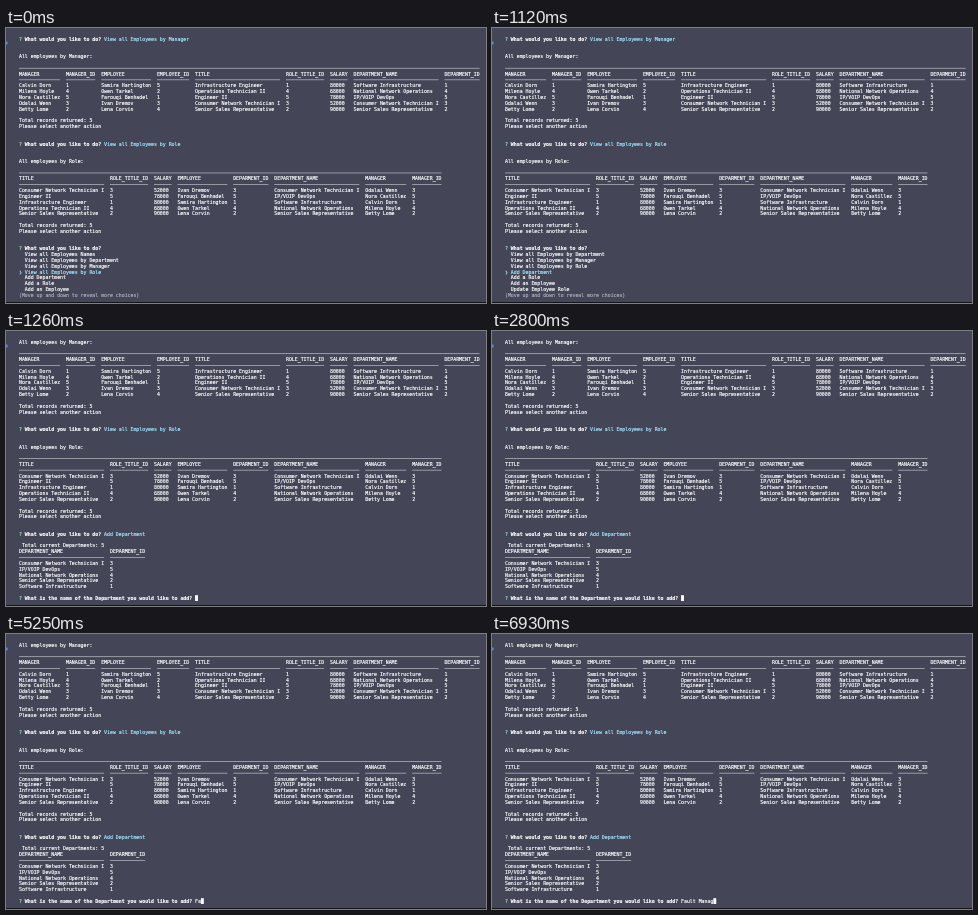
An HTML page with a canvas that plays this animation: 480 px wide and 275 px high, repeating every 8000 ms.

```html
<!DOCTYPE html>
<html lang="en">
<head>
<meta charset="utf-8">
<title>Employee tracker</title>
<style>
  html, body { margin: 0; width: 100%; height: 100%; overflow: hidden; background: #444657; }
  canvas { display: block; }
</style>
</head>
<body>
<canvas id="stage" width="480" height="275"></canvas>
<script>
const ctx = document.getElementById('stage').getContext('2d');
const LOOP = 8000, LEFT = 13, TOP = 11, CELL = 2.934, LINE = 5.82;
const FONT_SIZE = 40, SCALE = CELL / (FONT_SIZE * 0.602);
const BACK = '#444657', WHITE = '#fafafc', GREEN = '#a5e6c8', CYAN = '#a0e4ff', GREY = '#a8aab5', RULE = '#cfd0d6';

const roles = ['Consumer Network Technician I', 'Engineer II', 'Infrastructure Engineer',
  'Operations Technician II', 'Senior Sales Representative'];
const departments = ['Consumer Network Technician I', 'IP/VOIP DevOps', 'National Network Operations',
  'Senior Sales Representative', 'Software Infrastructure'];

// role, role id, salary, employee, department id, department, manager, manager id, employee id
const staff = [
  [roles[0], 3, 52000, 'Ivan Dremov', 3, departments[0], 'Odalai Wenn', 3, 3],
  [roles[1], 5, 78000, 'Farouqi Benhadel', 5, departments[1], 'Nora Castillez', 5, 1],
  [roles[2], 1, 80000, 'Samira Hartington', 1, departments[4], 'Calvin Dorn', 1, 5],
  [roles[3], 4, 68000, 'Owen Tarkel', 4, departments[2], 'Milena Hoyle', 4, 2],
  [roles[4], 2, 90000, 'Lena Corvin', 2, departments[3], 'Betty Lome', 2, 4]
];
const heads = ['TITLE', 'ROLE_TITLE_ID', 'SALARY', 'EMPLOYEE', 'DEPARMENT_ID',
  'DEPARTMENT_NAME', 'MANAGER', 'MANAGER_ID', 'EMPLOYEE_ID'];
const managerOrder = [6, 7, 3, 8, 0, 1, 2, 5, 4];
const pick = (row, order) => order.map(i => row[i]);

const menu = ['View all Employees Names', 'View all Employees by Department', 'View all Employees by Manager',
  'View all Employees by Role', 'Add Department', 'Add a Role', 'Add an Employee', 'Update Employee Role'];

const answer = 'Fault Manag';
const keyTimes = [4970, 5250, 5460, 5670, 5880, 6020, 6300, 6510, 6580, 6790, 6930];

let scroll = 0;
const x = col => LEFT + col * CELL;
const y = row => TOP + (row - scroll) * LINE;

function write(row, col, text, color = WHITE, bold = false) {
  ctx.setTransform(SCALE, 0, 0, SCALE, x(col), y(row) + 1.75);
  ctx.font = `${bold ? 'bold ' : ''}${FONT_SIZE}px "DejaVu Sans Mono", monospace`;
  ctx.fillStyle = ctx.strokeStyle = color;
  ctx.lineWidth = 1.5;
  ctx.fillText(text, 0, 0);
  ctx.strokeText(text, 0, 0);
  ctx.setTransform(1, 0, 0, 1, 0, 0);
}

function rule(row, col, length) {
  ctx.fillStyle = RULE;
  ctx.fillRect(x(col), y(row) - 0.2, length * CELL, 0.6);
}

function prompt(row, question, reply = '') {
  write(row, 0, '?', GREEN);
  write(row, 2, question, WHITE, true);
  write(row, question.length + 3, reply, CYAN);
}

function cursor(row, col) {
  ctx.fillStyle = WHITE;
  ctx.fillRect(x(col), y(row) - 2.9, CELL, LINE);
}

function table(row, titles, rows, topRule) {
  let col = 0;
  titles.forEach((title, i) => {
    const cells = rows.map(r => String(r[i]));
    const width = Math.max(title.length, ...cells.map(c => c.length));
    write(row, col, title);
    rule(row + 1, col, width);
    cells.forEach((cell, n) => write(row + 2 + n, col, cell));
    col += width + 2;
  });
  if (topRule) rule(row - 1, 0, col - 2);
}

function report(row, group, titles, rows) {
  prompt(row, 'What would you like to do?', 'View all Employees by ' + group);
  write(row + 3, 0, `All employees by ${group}:`);
  table(row + 6, titles, rows, true);
  write(row + 14, 0, 'Total records returned: 5');
  write(row + 15, 0, 'Please select another action');
}

function drawMenu(first, selected) {
  menu.slice(first, first + 7).forEach((item, i) => {
    const on = first + i === selected;
    write(37 + i, 0, (on ? '❯ ' : '  ') + item, on ? CYAN : WHITE);
  });
  write(44, 0, '(Move up and down to reveal more choices)', GREY);
}

function drawWindowEdges() {
  ctx.fillStyle = '#14151b';
  ctx.fillRect(0, 274, 480, 1);
  ctx.fillStyle = '#5f86d0';
  ctx.beginPath();
  ctx.arc(0, 15, 1.8, 0, Math.PI * 2);
  ctx.fill();
}

function draw(t) {
  scroll = t < 1260 ? 0 : 3;
  ctx.fillStyle = BACK;
  ctx.fillRect(0, 0, 480, 275);

  const byManager = [2, 3, 1, 0, 4].map(i => pick(staff[i], managerOrder));
  report(0, 'Manager', pick(heads, managerOrder), byManager);
  report(18, 'Role', heads.slice(0, 8), staff);
  prompt(36, 'What would you like to do?', t < 1190 ? '' : 'Add Department');

  if (t < 1190) {
    const moved = t >= 70 ? 1 : 0;
    drawMenu(moved, 3 + moved);
  } else if (t < 1260) {
    cursor(37, 0);
  } else {
    const question = 'What is the name of the Department you would like to add?';
    const typed = keyTimes.filter(k => k <= t).length;
    const start = question.length + 3;
    write(38, 1, 'Total current Departments: 5');
    table(39, ['DEPARTMENT_NAME', 'DEPARMENT_ID'], departments.map((d, i) => [d, [3, 5, 4, 2, 1][i]]));
    prompt(47, question);
    write(47, start, answer.slice(0, typed));
    cursor(47, start + typed);
  }
  drawWindowEdges();
}

function tick() {
  draw(performance.now() % LOOP);
  requestAnimationFrame(tick);
}
tick();
</script>
</body>
</html>
```
